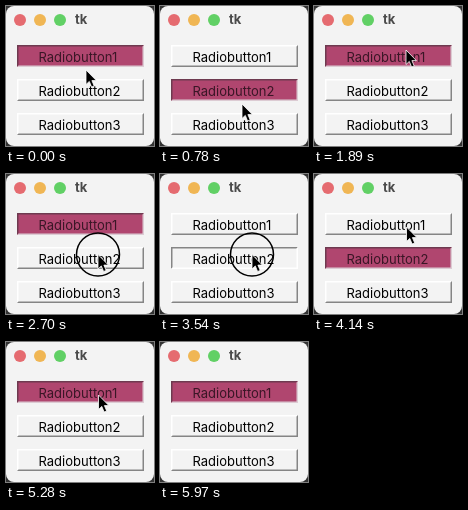
These frames come from a looping animation (148x140 px, 6390 ms). An HTML page:

```html
<!DOCTYPE html>
<html lang="en">
<head>
<meta charset="utf-8">
<title>tk</title>
<style>
html, body { margin: 0; width: 148px; height: 140px; overflow: hidden; background: #333; }
svg { display: block; }
text { font: 13px Inter, "Open Sans", sans-serif; }
.title { font-weight: 700; fill: #4b4b4b; }
</style>
</head>
<body>
<svg width="148" height="140" viewBox="0 0 148 140">
  <rect width="148" height="140" rx="8" fill="#f3f3f3"/>
  <circle cx="14" cy="14" r="6" fill="#e56b70"/>
  <circle cx="34" cy="14" r="6" fill="#f0b654"/>
  <circle cx="54" cy="14" r="6" fill="#61d065"/>
  <text class="title" x="69" y="18">tk</text>
  <g id="buttons"></g>
  <g id="pointer">
    <path d="M0 0V14.5L3.3 11.4L5.6 17L8.2 15.9L5.9 10.6H10.4Z" stroke="#fff" stroke-width=".8"/>
    <circle id="ring" fill="none" stroke="#000" stroke-width="1.5"/>
  </g>
</svg>
<script>
const LOOP = 6390, STEP = 30, GLIDE = 210, HOLD = 120;
const TOP = 39, PITCH = 34, HEIGHT = 22;

// The pointer rests at each place until the next glide starts.
const start = { x: 80, y: 64 };
const glides = [
  { at: 60, x: 82, y: 85 },
  { at: 690, x: 82, y: 118 },
  { at: 1380, x: 92, y: 44 },
  { at: 2160, x: 92, y: 80.5 },
  { at: 3810, x: 92.5, y: 53 },
  { at: 5520, x: 62, y: 92 },
  { at: 5730, x: 46, y: 143 }
];
const presses = [330, 1080, 1770, 2610, 3120, 3450, 4200, 4620, 5040];

const $ = id => document.getElementById(id);
const set = (el, attrs) => {
  for (const key in attrs) el.setAttribute(key, attrs[key]);
};
const clamp = k => Math.max(0, Math.min(1, k));
const ease = k => k * k * (3 - 2 * k);

$("buttons").innerHTML = [0, 1, 2].map(i => `
  <g transform="translate(11 ${TOP + PITCH * i})">
    <rect width="127" height="${HEIGHT}"/>
    <path d="M0 22V0H127L125.5 1.5H1.5V20.5Z"/>
    <path d="M0 22H127V0L125.5 1.5V20.5H1.5Z"/>
    <text x="21.5" y="17">Radiobutton${i + 1}</text>
  </g>`).join("");

const buttons = [...$("buttons").children];

function pointerAt(t) {
  let { x, y } = start;
  for (const g of glides) {
    const k = ease(clamp((t - g.at) / GLIDE));
    x += (g.x - x) * k;
    y += (g.y - y) * k;
  }
  return { x, y };
}

const buttonAt = t => Math.round((pointerAt(t).y - TOP - HEIGHT / 2) / PITCH);

function drawButton(el, selected, pressed) {
  const [face, upper, lower, label] = el.children;
  const colored = selected && !pressed;
  set(face, { fill: colored ? "#b0466f" : "#f3f3f3" });
  set(upper, { fill: colored ? "#6e3a50" : selected ? "#858585" : "#fff" });
  set(lower, { fill: colored ? "#dccbd3" : selected ? "#fff" : "#858585" });
  set(label, { fill: colored ? "#3a1626" : "#000" });
}

function draw(now) {
  const t = Math.floor((now % LOOP) / STEP) * STEP;
  const press = presses.find(p => t >= p && t < p + HOLD);
  const last = presses.filter(p => t >= p + HOLD).at(-1);
  const pressed = press ? buttonAt(press) : -1;
  const selected = last ? buttonAt(last) : 0;
  buttons.forEach((el, i) => drawButton(el, i === selected, i === pressed));

  const { x, y } = pointerAt(t);
  const grow = press ? clamp((t - press + STEP) / 90) : 0;
  set($("pointer"), { transform: `translate(${x} ${y})` });
  set($("ring"), { r: 21.5 * (1 + grow) / 2, opacity: grow });
  requestAnimationFrame(draw);
}
draw(0);
</script>
</body>
</html>
```
